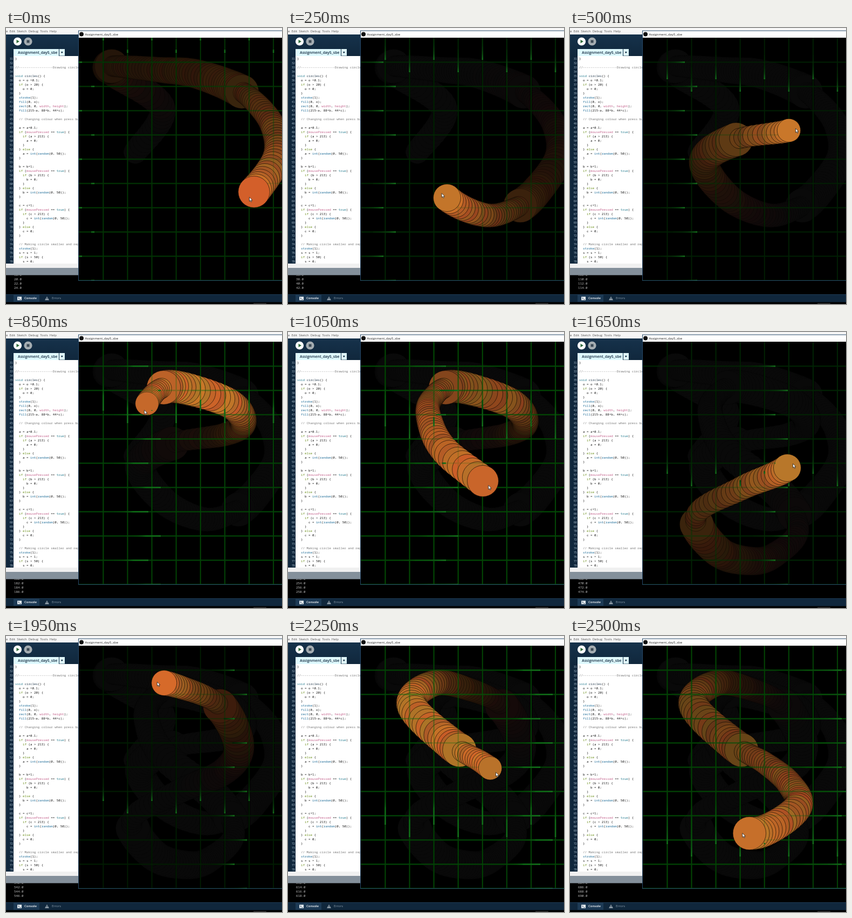
These frames come from a looping animation (512 by 512 pixels, 2.55 s). An HTML page with a canvas:

```html
<!DOCTYPE html>
<html lang="en">
<head>
<meta charset="utf-8">
<title>Circle trail sketch</title>
<style>
html, body { margin: 0; width: 100%; height: 100%; overflow: hidden; background: #000; }
svg, canvas { position: absolute; display: block; }
svg { left: 0; top: 0; }
canvas { left: 135px; top: 18px; }
text { white-space: pre; }
.mono { font: 5.82px "Noto Sans Mono", "DejaVu Sans Mono", monospace; }
.ui { font-family: "Open Sans", "Noto Sans", sans-serif; }
</style>
</head>
<body>
<svg id="ui" width="512" height="512" viewBox="0 0 512 512"></svg>
<canvas id="sketch" width="377" height="450"></canvas>
<script>
const LOOP = 2550, TICK = 50, RATE = 0.1455;

// ---------- editor window ----------
const counter = (name, first, other) => `
  ${first}
  if (mousePressed == true) {
    if (${name} > 213) {
      ${name} = ${name === "c" ? other[0] : "0"};
    }
  } else {
    ${name} = ${other[1]};
  }
`;
const dice = "int(random(0, 50))";
const code = `}

//------------------Drawing circles

void circles() {
  o = o +0.1;
  if (o > 20) {
    o = 0;
  }
  stroke(1);
  fill(0, o);
  rect(0, 0, width, height);
  fill(215-a, 88+b, 44+c);

  // Changing colour when press button
${counter("a", "a = a+0.1;", ["0", dice])}${counter("b", "b = b+1;", ["0", dice])}${counter("c", "c = c+1;", [dice, "0"])}
  // Making circle smaller and repeat
  stroke(1);
  s = s + 1;
  if (s > 50) {
    s = 0;`.split("\n");

const inks = [
  [/^\/\//, "#777"],
  [/^(if|else)$/, "#6b8f1a"],
  [/^(void|true)$/, "#2a7f92"],
  [/^circles$/, "#1c3347"],
  [/^(stroke|fill|rect|int|random)$/, "#1b6a96"],
  [/^(mousePressed|width|height)$/, "#c4628c"]
];

function colour(line) {
  return line.replace(/\/\/.*|[A-Za-z]+/g, word => {
    const ink = inks.find(([re]) => re.test(word));
    return ink ? `<tspan fill="${ink[1]}">${word}</tspan>` : word;
  });
}

const rect = (x, y, w, h, fill) =>
  `<rect x="${x}" y="${y}" width="${w}" height="${h}" fill="${fill}"/>`;
const label = (x, y, size, fill, s, more = "") =>
  `<text class="ui" x="${x}" y="${y}" font-size="${size}" fill="${fill}" ${more}>${s}</text>`;
const mono = (x, y, fill, s, more = "") =>
  `<text class="mono" x="${x}" y="${y}" fill="${fill}" ${more}>${s}</text>`;

function buildUi() {
  let s = `<defs><linearGradient id="bar" x2="0" y2="1">
    <stop stop-color="#16324b"/><stop offset="1" stop-color="#10273c"/></linearGradient></defs>`;
  s += rect(0, 0, 512, 512, "#000") + rect(0, 0, 512, 12, "#f6f6f6");
  s += label(0, 8, 6, "#555", "e  Edit  Sketch  Debug  Tools  Help");

  s += rect(0, 12, 135, 41, "url(#bar)");
  s += `<circle cx="21.5" cy="25" r="7.6" fill="#fff"/><path d="M19.5 21.8v6.4l5.4-3.2z" fill="#2f6b3a"/>`;
  s += `<circle cx="41" cy="25" r="7.6" fill="#a5adb2"/>` + rect(38.5, 22.5, 5, 5, "#3c4a55");
  s += rect(14, 39, 84, 14, "#dffaff") + rect(99, 39, 10, 12.5, "#dffaff");
  s += label(22, 47.5, 7, "#12283c", "Assignment_day5_sbe", 'font-weight="600"');
  s += `<path d="M101.8 44h4l-2 3.2z" fill="#12283c"/>`;

  s += rect(0, 52, 14, 385, "#10273c") + rect(14, 52, 121, 385, "#fff");
  code.forEach((line, i) => {
    const y = 59 + 8 * i;
    s += mono(13, y, "#a9bccb", 31 + i, 'text-anchor="end" style="font-size:5.3px"');
    s += mono(17, y, "#111", colour(line));
  });

  s += rect(0, 437, 135, 8, "#f0f0f0") + rect(0, 445, 135, 13.5, "#84909b");
  s += `<clipPath id="log"><rect x="0" y="458.5" width="134" height="36"/></clipPath><g clip-path="url(#log)">`;
  for (let i = 0; i < 4; i++) s += mono(15, 460 + 8 * i, "#c8c8c8", "", 'data-log="1"');
  s += "</g>";

  s += rect(0, 494, 512, 14.5, "#10273c") + rect(0, 494, 512, 0.8, "#24425e");
  s += rect(14, 495, 48, 13, "#1d3a55") + rect(21, 498.5, 8, 6.5, "#e8eef2");
  s += `<path d="M22.5 500l2 1.6-2 1.6M25.3 503.5h2.4" fill="none" stroke="#1d3a55" stroke-width=".9"/>`;
  s += label(34, 503.4, 6, "#fff", "Console", 'font-weight="600"');
  s += `<path d="M76 498l4 7h-8z" fill="#8d9ba6"/>` + rect(75.6, 500.2, 0.9, 2.5, "#10273c");
  s += label(85, 503.4, 6, "#8fa0ae", "Errors");
  s += rect(459, 510.5, 24, 1.5, "#333");

  s += rect(134, 4.6, 378, 464.4, "#27496a") + rect(135, 5.6, 377, 12.4, "#fff") + rect(135, 18, 377, 450, "#000");
  s += `<circle cx="140" cy="11.6" r="4" fill="#111"/>`;
  s += label(146.5, 13.6, 6, "#222", "Assignment_day5_sbe");
  document.getElementById("ui").innerHTML = s;
}
buildUi();
const logRows = [...document.querySelectorAll("[data-log]")];

// The log is flushed in bursts, every quarter of a second.
function showLog(t) {
  const last = t < 150 ? 24 : 42 + 72 * Math.floor((t - 150) / 250);
  logRows.forEach((row, i) => { row.textContent = (last - 6 + 2 * i).toFixed(1); });
}

// ---------- sketch ----------
const g = document.getElementById("sketch").getContext("2d");
g.translate(-135, -18);

// Where the pointer is at every 12th step, from FIRST on
const FIRST = -132, SPAN = 12;
const path = [
  [240, 230], [290, 150], [205, 85], [192, 72], [224, 72], [290, 78], [348, 84], [415, 107],
  [456, 132], [494, 180], [502, 240], [460, 304], [420, 335], [365, 347], [295, 315],
  [249, 248], [308, 207], [406, 190], [440, 167], [410, 130], [308, 101], [266, 125],
  [262, 162], [293, 222], [392, 303], [423, 368], [382, 412], [338, 425], [275, 407],
  [234, 340], [318, 290], [403, 252], [432, 204], [397, 130], [330, 97], [270, 88],
  [229, 128], [302, 200], [362, 236], [407, 274], [422, 318], [352, 364], [282, 358]
];
const LAST = FIRST + SPAN * (path.length - 1);

// Catmull-Rom curve through the path
function pointAt(n) {
  const at = (n - FIRST) / SPAN, i = Math.floor(at), u = at - i;
  const [a, b, c, d] = [-1, 0, 1, 2].map(k => path[Math.min(Math.max(i + k, 0), path.length - 1)]);
  return [0, 1].map(k => b[k] + 0.5 * u * (c[k] - a[k] +
    u * (2 * a[k] - 5 * b[k] + 4 * c[k] - d[k] + u * (3 * (b[k] - c[k]) + d[k] - a[k]))));
}

const mod = (a, b) => ((a % b) + b) % b;
function random(n, k) {
  const v = Math.sin(n * 12.9898 + k * 78.233) * 43758.5453;
  return v - Math.floor(v);
}

// Darkness laid down at every step, summed so that any fade is one subtraction.
const dark = [0];
for (let n = FIRST; n <= LAST; n++) {
  const o = mod(n + 105, 201) / 10;
  dark.push(dark[dark.length - 1] + Math.max(o - 1, 0) / 255);
}
const fade = (from, to) => Math.exp(dark[Math.max(from - FIRST, 0)] - dark[to - FIRST]);

const dots = [];
for (let n = FIRST; n <= LAST; n++) {
  const [x, y] = pointAt(n);
  const rgb = [217 - 34 * random(n, 1), 94 + 32 * random(n, 2), 42];
  dots.push({ n, x, y, r: 19 + mod(41 + n, 51) / 4, rgb });
}

const shade = (rgb, f, floor = 0) =>
  `rgb(${rgb.map(v => Math.round(Math.max(v * f, floor))).join()})`;

const columns = Array.from({ length: 8 }, (_, i) => 180.4 + 45.1 * i);
const rows = Array.from({ length: 10 }, (_, i) => 63.4 + 45 * i);
const grid = new Path2D();
columns.forEach(x => grid.rect(x - 1.1, 18, 2.2, 450));
rows.forEach(y => grid.rect(135, y - 1.1, 377, 2.2));

// The faint grid is laid over the circles once per block of steps.
const BLOCK = 8, VEIL = 1 - Math.pow(1 - 0.0235, BLOCK);

function drawGrid(f) {
  g.globalAlpha = VEIL;
  g.fillStyle = shade([9, 112, 15], f);
  g.fill(grid);
  g.globalAlpha = 1;
}

function drawSparks(n, f) {
  g.fillStyle = shade([22, 112, 30], f);
  columns.forEach((x, i) => g.fillRect(x - 1.3, 22 + n + 23 * (i % 2), 2.6, 1));
  rows.forEach((y, i) => g.fillRect(140 + n + 23 * (i % 2), y - 1.3, 1, 2.6));
}

function drawDot(d, f) {
  g.beginPath();
  g.arc(d.x, d.y, d.r, 0, 2 * Math.PI);
  g.fillStyle = shade(d.rgb, f, 9);
  g.fill();
  g.globalAlpha = 0.15 + 0.5 * Math.min(1, 2 * f);
  g.stroke();
  g.globalAlpha = 1;
}

const arrow = new Path2D("M0 0V7.6L1.8 6L3.1 8.8L4.4 8.2L3.2 5.5H5.5Z");
const LEAD = 13;

// The pointer runs a little ahead of the newest circle.
function drawPointer(n) {
  const [x0, y0] = pointAt(n - 0.5), [x1, y1] = pointAt(n + 0.5), [x, y] = pointAt(n);
  const k = LEAD / (Math.hypot(x1 - x0, y1 - y0) || 1);
  g.save();
  g.translate(x + (x1 - x0) * k, y + (y1 - y0) * k);
  g.fillStyle = "#fff";
  g.strokeStyle = "#222";
  g.lineWidth = 0.8;
  g.fill(arrow);
  g.stroke(arrow);
  g.restore();
}

function drawSketch(now) {
  g.fillStyle = "#000";
  g.fillRect(135, 18, 377, 450);
  g.strokeStyle = "#010101";
  g.lineWidth = 0.9;
  for (const d of dots) {
    if (d.n > now) break;
    const f = fade(d.n, now);
    if ((now - d.n) % BLOCK === 0) drawGrid(fade(d.n - BLOCK / 2, now));
    drawDot(d, f);
    if (d.n >= -5 && f > 0.08) drawSparks(d.n, f);
  }
  drawPointer(now);
}

let shown = -1;
function update(time) {
  const tick = Math.floor((time % LOOP) / TICK);
  if (tick !== shown) {
    shown = tick;
    showLog(tick * TICK);
    drawSketch(Math.floor(tick * TICK * RATE));
  }
}

const start = performance.now();
function loop() {
  update(performance.now() - start);
  requestAnimationFrame(loop);
}
loop();
</script>
</body>
</html>
```
